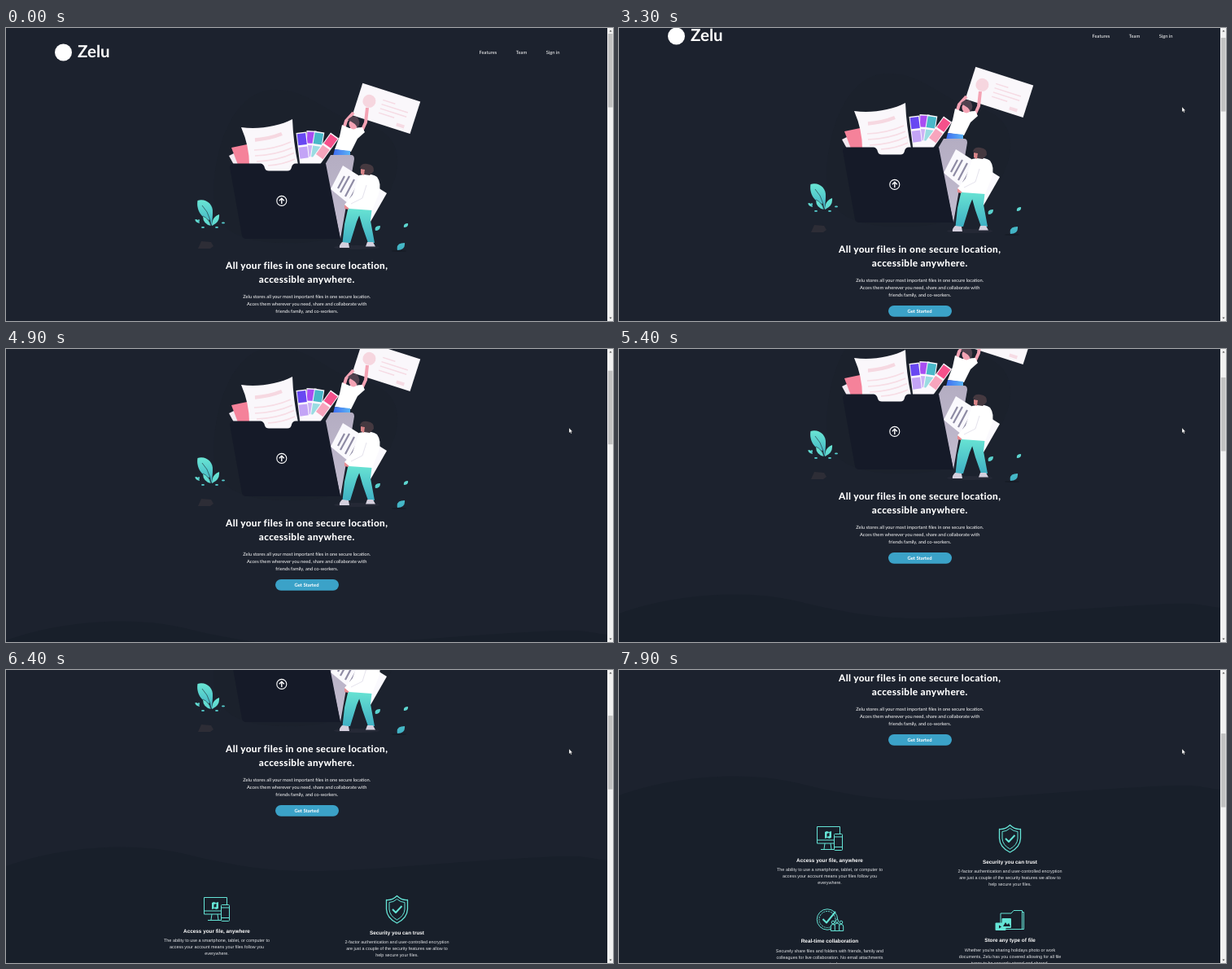
Write an HTML page that moves like this. It is 746 px wide and 360 px high and loops after 8 s.

```html
<!DOCTYPE html>
<html lang="en">
<head>
<meta charset="utf-8">
<title>Landing page scroll</title>
<style>
  html, body { margin: 0; width: 100%; height: 100%; overflow: hidden; background: #1c222e; }
  svg { display: block; width: 100%; height: 100%; }
  text { fill: #fff; font-family: Lato, "Open Sans", sans-serif; text-rendering: geometricPrecision; }
  .brand { font-size: 20.5px; font-weight: 700; }
  .nav { font-size: 5.8px; }
  .head { font-size: 11.8px; font-weight: 800; letter-spacing: .35px; }
  .lead { font-size: 5.74px; }
  .btn { font-size: 5.88px; font-weight: 700; }
  .title, .desc { font-family: "Liberation Sans", Arial, sans-serif; }
  .title { font-size: 6.38px; font-weight: 700; }
  .desc { font-size: 5.43px; fill: #e4e6e9; }
  .mid { text-anchor: middle; }
  .line { fill: none; stroke: #65e4d6; stroke-width: 1; stroke-linejoin: round; }
  .fill { fill: #65e4d6; }
</style>
</head>
<body>
<svg viewBox="0 0 746 360" preserveAspectRatio="none">
  <defs>
    <linearGradient id="teal" x2="0" y2="1">
      <stop stop-color="#6ae6d4"/><stop offset="1" stop-color="#3fb0c4"/>
    </linearGradient>
    <linearGradient id="jeans"><stop stop-color="#3f6df0"/><stop offset="1" stop-color="#5bb4f5"/></linearGradient>
    <linearGradient id="lilac" x2="0" y2="1">
      <stop stop-color="#b4adc2"/><stop offset="1" stop-color="#c3bdd0"/>
    </linearGradient>
  </defs>

  <g id="page">
    <path fill="#181f2a" d="M0 436C60 414 150 404 220 421S330 443 390 442S520 433 620 427S700 424 740 429V900H0Z"/>
    <circle cx="70.5" cy="30" r="10.5" fill="#fff"/>

    <!-- backdrop -->
    <path fill="#1b212c" d="M256 215C252 170 270 82 325 76C375 73 395 110 440 118C480 126 490 160 474 195C460 235 420 262 360 264C300 266 260 255 256 215Z"/>
    <ellipse cx="431" cy="269.500" rx="28" ry="2.500" fill="#252936"/>

    <!-- certificate -->
    <g transform="translate(438.300 67.800) rotate(17.800)">
      <rect width="74.500" height="41.500" fill="#faf7fb"/>
      <circle cx="14.500" cy="18.500" r="8" fill="#f6d6df"/>
      <path stroke="#f6dbe4" stroke-width="1.500" d="M30 12H46M30 17.500H64M30 23H64M30 28.500H50"/>
      <path stroke="#f6dbe4" stroke-width="4" d="M55 35.500H65"/>
    </g>

    <!-- person on top -->
    <path fill="none" stroke="#f4a3b4" stroke-width="4" stroke-linejoin="round" d="M415 124L418 114L427 104M437 127L442 116L444 98"/>
    <path fill="#fff" d="M413 119L422 123L438 122L441 128L432 136L424 152L404 149L410 133Z"/>
    <ellipse cx="427" cy="118" rx="5.500" ry="6.500" fill="#f4a3b4"/>
    <path fill="#51424f" d="M420 113Q424 107 431 109Q437 115 432 123Q430 117 420 113Z"/>
    <path fill="url(#jeans)" d="M404 149L423 151V157H402Z"/>

    <g id="cards"></g>

    <!-- papers in the folder -->
    <path fill="#f3eaf1" d="M274 157L282 153L288 168H280Z"/>
    <path fill="#f5829a" d="M277 147L301 142L305 168H285Z"/>
    <path fill="#faf7fb" d="M289 122C310 125 335 121 352 112Q353 140 359 168L353 178H318L299 168Q299 145 289 122Z"/>
    <path fill="none" stroke="#f7dde5" stroke-width="1.600" d="M305 150Q330 149 350 140M306 157Q332 156 352 147M308 164Q334 163 354 153.500M322 169Q340 168 355 161"/>
    <path fill="none" stroke="#f6d8e1" stroke-width="4.500" d="M306 137.500Q324 136 339 130"/>

    <path fill="url(#lilac)" d="M392 168L399 156H424Q428 156 428 161L411 259Z"/>

    <!-- carrier -->
    <path fill="#faf9fd" d="M414 169L468 203L448 238L399 198Z"/>
    <path stroke="#8e8ba4" stroke-width="2.200" d="M416 182L408 197M422 182L411 202M428 186L417 207M434 190L423 210"/>
    <path fill="url(#teal)" d="M421 219L438 221L431 238L423 264H413.500L416 241ZM431 219H450L448 237L453 264H445L438 244Z"/>
    <path fill="#d5d0de" d="M413 263L421 264L422 270H410Q409 267 413 263ZM444 263H451L454 268.500H442Z"/>
    <path fill="#e98b91" d="M416 217L421 218V223L416 222Z"/>
    <path fill="#fff" d="M434 181Q448 177 456 183Q462 191 458 204L450 224L422 222L416 217L426 205Z"/>
    <path fill="none" stroke="#dedbe8" stroke-width=".8" d="M443 193L438 209L424 216"/>
    <path fill="#453940" d="M435 172Q436 166 444 167Q453 168 452 176L447 181L440 180L441 174Z"/>
    <path fill="#d98588" d="M436 173L441 174L440 181L436 179Z"/>

    <!-- folder front -->
    <path fill="#151a28" d="M279 166.500H313Q317 167 318 172Q319 175.500 323 175.500H346Q350 175.500 351 171Q352 166.500 356 166.500H393L411 259H295Q291 259 290 255L275 171Q275 167 279 166.500Z"/>
    <g fill="none" stroke="#fff" stroke-width="1.100">
      <circle cx="338.800" cy="212.400" r="6"/>
      <path stroke-width="1.400" d="M338.800 216V209.500M335.800 212.300L338.800 209.300L341.800 212.300"/>
    </g>

    <!-- plants and stones -->
    <g fill="url(#teal)">
      <path d="M251 236C240 234 233.500 223 235.500 212C246 209 255 217 254 227Q254 233 252.500 243L251 236Z"/>
      <path d="M252 243Q242 241 242 231Q250 234 252 243ZM253 243Q253 232 262 229Q263 239 253 243ZM238 240Q232 239 232.500 235Q237 235 238 240ZM454 249Q452 243 460 243Q460 249 454 249ZM489 245Q488 240 494 240Q495 245 489 245ZM481 273Q479 264 490 264Q491 273 481 273Z"/>
      <ellipse cx="267" cy="239.500" rx="2" ry="1"/><ellipse cx="242" cy="245" rx="2" ry="1"/>
      <ellipse cx="259" cy="245" rx="2" ry="1"/><ellipse cx="237" cy="236.500" rx="1" ry="1.500"/>
    </g>
    <path fill="none" stroke="#1c222e" stroke-width=".6" d="M241 218Q248 225 251 236M242 231Q249 234 252 243"/>
    <path fill="#2d2d36" d="M236 271L240 262L252 263L255 268L251 271Z"/>
    <ellipse cx="483" cy="274" rx="9" ry="1" fill="#171c26"/>

    <rect x="331" y="361" width="78" height="13.700" rx="6.850" fill="#3ba2c8"/>

    <!-- feature icons -->
    <g class="line">
      <rect x="243.500" y="474.500" width="28" height="20.500"/>
      <path d="M243.500 491H271.500M253 495L252 502M260 495L261 502M248 502.500H264"/>
      <rect x="264.500" y="483.500" width="10" height="20" rx="1" fill="#181f2a"/>
      <path d="M264.500 487H274.500M264.500 499.500H274.500"/>

      <path stroke-width="1.300" d="M480.500 472.500Q486 478 493.500 477.500V489Q493 500 480.500 506Q468 500 467.500 489V477.500Q475 478 480.500 472.500Z"/>
      <path d="M480.500 476.500Q485 480.500 490 480.500V489Q489.500 497 480.500 502Q471.500 497 471 489V480.500Q476 480.500 480.500 476.500Z"/>
      <path stroke-width="2" d="M475 489L479 493L486.500 485"/>

      <circle cx="256" cy="588.500" r="12.700"/>
      <circle cx="256" cy="588.500" r="10" stroke-dasharray="2 1"/>
      <path stroke-width="2" d="M250.500 588L255 592.500L266 579"/>

      <path d="M469 600.500V581H482L485 577.500H495.500V600.500H469M495.500 579.500H497.500V600.500H495"/>
    </g>
    <path class="fill" d="M253 481L255.500 480L258 481L261 480V488L258.500 489L256 488L253 489Z"/>
    <path fill="#181f2a" d="M255.500 483L258.500 482V486L255.500 487Z"/>
    <g class="line" id="crowd"></g>
    <g class="fill">
      <rect x="462.500" y="592.500" width="13" height="9.500" rx="1"/>
      <rect x="470.500" y="587" width="11.500" height="12" rx="1"/>
    </g>
    <path fill="#181f2a" d="M472 597L475 592L477 595L479 593L481 597ZM467 595.500L470 597.500L467 599.500Z"/>
  </g>

  <!-- scrollbar -->
  <rect x="739" width="7" height="360" fill="#f1f1f1"/>
  <path fill="#505050" d="M741.500 4.500L743 2.500L744.500 4.500ZM741.500 355.500L743 357.500L744.500 355.500Z"/>
  <rect id="thumb" x="740" y="7" width="5.500" height="90.500" fill="#c1c1c1"/>

  <path id="cursor" fill="#fff" stroke="#222" stroke-width=".3" d="M0 0V6L1.400 4.900L2.300 7L3.300 6.500L2.400 4.600H4.200Z"/>
</svg>

<script>
const NS = 'http://www.w3.org/2000/svg';
const LOOP = 8000, STEP = 100, NOTCH = 39;
const $ = id => document.getElementById(id);
const page = $('page');

function add(parent, tag, attrs, content = '') {
  const el = document.createElementNS(NS, tag);
  for (const key in attrs) el.setAttribute(key, attrs[key]);
  el.textContent = content;
  return parent.appendChild(el);
}

function lines(cls, x, y, pitch, ...rows) {
  rows.forEach((row, i) => add(page, 'text', { class: cls, x, y: y + i * pitch }, row));
}

function feature(x, titleY, descY, title, ...rows) {
  lines('title mid', x, titleY, 0, title);
  lines('desc mid', x, descY, 8, ...rows);
}

lines('brand', 88, 35.5, 0, 'Zelu');
lines('nav', 581.5, 31.7, 0, 'Features');
lines('nav', 626.8, 31.7, 0, 'Team');
lines('nav', 663.7, 31.7, 0, 'Sign in');
lines('head mid', 369.7, 295.6, 17.7, 'All your files in one secure location,', 'accessible anywhere.');
lines('lead mid', 369.7, 332, 9,
  'Zelu stores all your most important files in one secure location.',
  'Acces them wherever you need, share and collaborate with',
  'friends family, and co-workers.');
lines('btn mid', 369.5, 369.8, 0, 'Get Started');

feature(259, 518, 529, 'Access your file, anywhere',
  'The ability to use a smartphone, tablet, or computer to',
  'access your account means your files follow you',
  'everywhere.');
feature(480.5, 519.8, 531, 'Security you can trust',
  '2-factor authentication and user-controlled encryption',
  'are just a couple of the security features we allow to',
  'help secure your files.');
feature(259, 617, 628.5, 'Real-time collaboration',
  'Securely share files and folders with friends, family and',
  'colleagues for live collaboration. No email attachments',
  'required.');
feature(480.5, 616, 627.5, 'Store any type of file',
  "Whether you're sharing holidays photo or work",
  'documents, Zelu has you covered allowing for all file',
  'types to be securely stored and shared.');

// Colour sample cards, back to front: x, y, angle, strong colour, pale colour
[[369.5, 126, 3, '#a94df2', '#cdb2f5'],
 [356.5, 129, -7, '#6848f2', '#c3a4f6'],
 [379, 126.5, 9, '#49b8c9', '#9adce2'],
 [399, 128.5, 36, '#f5518b', '#f7a5bd']].forEach(([x, y, angle, strong, pale]) => {
  const card = add($('cards'), 'g', { transform: `translate(${x} ${y}) rotate(${angle})` });
  add(card, 'rect', { width: 12.5, height: 42, fill: '#fbf8fd' });
  add(card, 'rect', { x: 1, y: 1.5, width: 10.5, height: 14, fill: strong });
  add(card, 'rect', { x: 1, y: 18, width: 10.5, height: 14, fill: pale });
});

[[263, 592], [273, 592], [268, 590.5]].forEach(([x, y]) => {
  add($('crowd'), 'path', { d: `M${x - 2.7} 602.5V${y + 5}q0 -2.5 2.7 -2.5t2.7 2.5V602.5Z`, fill: '#181f2a' });
  add($('crowd'), 'circle', { cx: x, cy: y, r: 1.8, fill: '#181f2a' });
});

// Wheel moves: start, duration, notches
const wheel = [[3100, 400, 1], [4100, 500, 1], [5100, 400, 1], [5760, 640, 2], [7000, 400, 2], [7700, 640, 1]];
// Pointer: time, x, y
const trail = [[700, 745, 136], [1200, 735, 121], [1400, 734, 120], [2300, 697, 108], [2600, 697, 108], [2900, 692, 97], [LOOP, 692, 97]];

const ease = p => p * p * (3 - 2 * p);
const clamp = p => Math.min(1, Math.max(0, p));

function scrollAt(t) {
  return Math.round(wheel.reduce(
    (sum, [start, time, n]) => sum + n * NOTCH * ease(clamp((t - start) / time)), 0));
}

function pointerAt(t) {
  const i = trail.findIndex(point => point[0] > t);
  if (i < 1) return null;
  const [t0, x0, y0] = trail[i - 1], [t1, x1, y1] = trail[i];
  const p = ease((t - t0) / (t1 - t0));
  return [x0 + (x1 - x0) * p, y0 + (y1 - y0) * p];
}

function draw(now) {
  const t = Math.floor(now % LOOP / STEP) * STEP;
  const y = scrollAt(t), pointer = pointerAt(t);
  page.setAttribute('transform', `translate(0 ${-y})`);
  $('thumb').setAttribute('y', 7 + y * .252);
  $('cursor').setAttribute('visibility', pointer ? 'visible' : 'hidden');
  if (pointer) $('cursor').setAttribute('transform', `translate(${pointer})`);
}

let begin;
function tick(now) {
  begin ??= now;
  draw(now - begin);
  requestAnimationFrame(tick);
}
draw(0);
requestAnimationFrame(tick);
</script>
</body>
</html>
```
